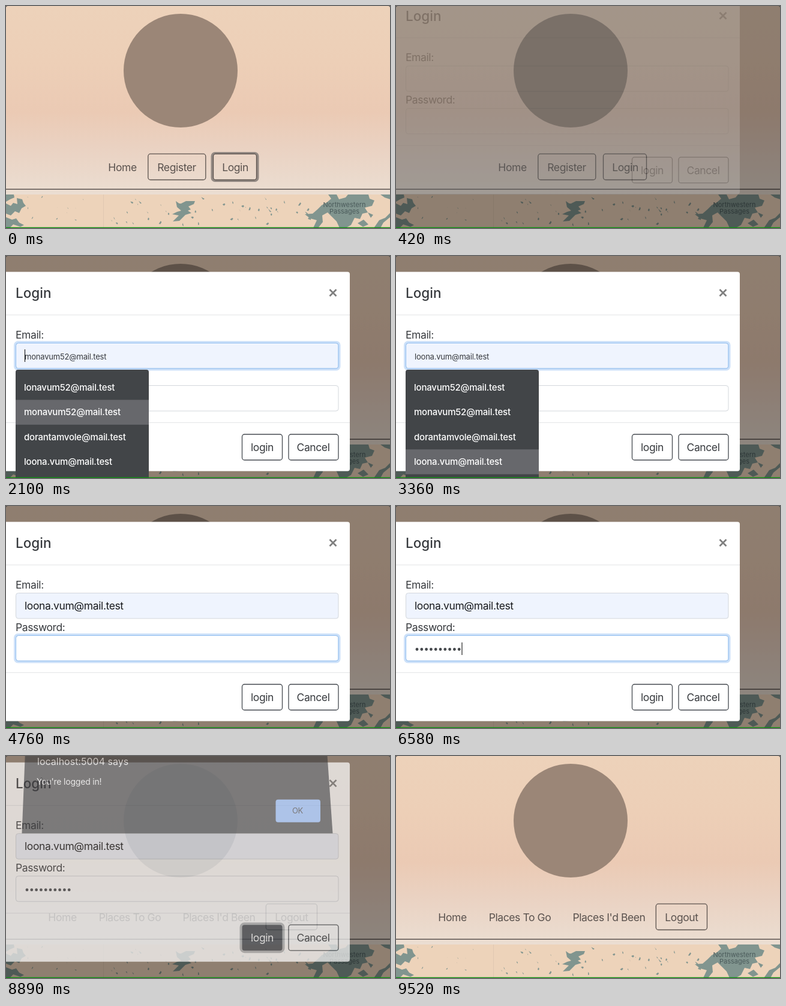
Animation of 640 by 371 pixels, one loop 9.59 s. Source, as an HTML page:

```html
<!DOCTYPE html>
<html lang="en">
<head>
<meta charset="utf-8">
<title>Login</title>
<style>
  html, body { margin: 0; width: 100%; height: 100%; overflow: hidden; }
  svg { display: block; width: 100vw; height: 100vh; }
  text { font: 17.5px Inter, "Liberation Sans", sans-serif; letter-spacing: -.4px; fill: #36393d; }
  .mid { text-anchor: middle; }
  .nav text { fill: #59514d; }
  .nav rect { fill: none; stroke: #5c534e; stroke-width: 1.3; }
  .map text { font-size: 11px; letter-spacing: 0; fill: #4b5b5b; }
  .land { fill: #81958f; }
  .rule { stroke: #e4e5e7; }
  .field { fill: #fff; stroke: #d3d7dc; }
  .ring { fill: none; stroke: #cde1f9; stroke-width: 4; }
  .edge { fill: none; stroke: #8fbdf0; }
  .button { fill: #fff; stroke: #454a50; stroke-width: 1.3; }
  .list text { font-size: 15px; font-weight: 500; letter-spacing: -.2px; fill: #fff; }
  .alert text { fill: #f1f2f4; }
</style>
</head>
<body>
<svg viewBox="0 0 640 371" preserveAspectRatio="none">
  <defs>
    <linearGradient id="sky" x1="0" y1="0" x2="0" y2="1">
      <stop offset="0" stop-color="#edd2ba"/>
      <stop offset=".3" stop-color="#edcfb7"/>
      <stop offset=".56" stop-color="#ebcab4"/>
      <stop offset=".75" stop-color="#ead2c2"/>
      <stop offset="1" stop-color="#ebded2"/>
    </linearGradient>
  </defs>

  <rect width="640" height="316" fill="url(#sky)"/>
  <circle cx="291" cy="108" r="95" fill="#9b8677"/>
  <g class="nav mid" id="guest">
    <text x="194" y="275.5">Home</text>
    <rect x="236.8" y="247.2" width="96" height="43.3" rx="4"/>
    <text x="284.5" y="275.5">Register</text>
    <rect id="loginRing" x="343.5" y="246" width="76" height="46" rx="5" style="stroke:#938983;stroke-width:4"/>
    <rect x="345.5" y="247.2" width="72" height="43.3" rx="4"/>
    <text x="382" y="275.5">Login</text>
  </g>
  <g class="nav mid" id="member">
    <text x="94" y="275.5">Home</text>
    <text x="206.5" y="275.5">Places To Go</text>
    <text x="355" y="275.5">Places I'd Been</text>
    <rect x="433.3" y="247.2" width="85.2" height="43.3" rx="4"/>
    <text x="476" y="275.5">Logout</text>
  </g>
  <path d="M0 306.3H640" stroke="#5b5350" stroke-width="1.5"/>

  <g class="map">
    <rect y="315" width="640" height="56" fill="#edd3ba"/>
    <path d="M162.5 315V371" stroke="#dfc8b1"/>
    <g class="land" id="land">
      <path d="M0 315H13L14 320 7 323 0 327ZM0 330 8 334 12 329 19 331 18 321 27 323 29 329 33 334 26 338 22 346 15 343 8 350 0 347ZM0 353 10 357 17 355 22 362 30 366 24 369 12 365 6 371H0Z"/>
      <path d="M283 326 290 331 300 326 315 326 313 331 304 335 308 340 303 342 309 346 299 349 289 359 278 360 288 350 277 348 285 344 292 342 285 336Z"/>
      <path d="M537 315H551L555 323 566 320 570 315H604L606 322 614 325 610 334 598 337 603 345 594 347 590 356 581 354 575 366 566 371H556L551 360 543 352 536 345 527 350 528 361 520 371H512L518 358 507 355 498 348 511 347 519 340 526 333 535 328 542 322ZM624 315H640V323L631 320ZM603 345 612 349 608 354ZM586 363 596 357 604 365 595 369ZM613 371 622 358 632 354 640 346V353L629 362 624 371Z"/>
    </g>
    <g class="mid">
      <text x="564" y="335.5">Northwestern</text>
      <text x="564" y="346.5">Passages</text>
    </g>
  </g>

  <rect id="shade" width="640" height="371"/>

  <g id="modal">
    <rect x="-10" y="26.5" width="583" height="333" rx="4" fill="#fff"/>
    <text x="16" y="70" style="font-size:22.5px;font-weight:500;letter-spacing:0">Login</text>
    <path d="M539.5 56 550.5 67M550.5 56 539.5 67" stroke="#808080" stroke-width="2.8"/>
    <path class="rule" d="M0 98.5H573M0 278.5H573"/>
    <text x="16" y="137.5">Email:</text>
    <text x="16" y="208.5">Password:</text>
    <rect id="emailBox" class="field" x="16.5" y="145.5" width="537.5" height="42.5" rx="4"/>
    <rect class="field" x="16.5" y="216.5" width="537.5" height="42.5" rx="4"/>
    <g id="emailFocus">
      <rect class="ring" x="15" y="144" width="540.5" height="45.5" rx="5"/>
      <rect class="edge" x="16.5" y="145.5" width="537.5" height="42.5" rx="4"/>
    </g>
    <g id="passFocus">
      <rect class="ring" x="15" y="215" width="540.5" height="45.5" rx="5"/>
      <rect class="edge" x="16.5" y="216.5" width="537.5" height="42.5" rx="4"/>
    </g>
    <text id="email" x="31" y="173"></text>
    <g id="dots" fill="#45484c"></g>
    <path id="caret" stroke="#222" stroke-width="1.2"/>
    <rect class="button" x="393.5" y="298" width="67" height="43" rx="4"/>
    <rect class="button" x="471" y="298" width="83" height="43" rx="4"/>
    <rect id="pressed" x="391.5" y="296" width="71" height="47" rx="6" fill="#4b5057" stroke="#b4b7ba" stroke-width="4"/>
    <g class="mid">
      <text id="submit" x="427" y="326">login</text>
      <text x="512" y="326">Cancel</text>
    </g>
    <g class="list" id="list">
      <path d="M16 371V194Q16 190 20 190H234Q238 190 238 194V371Z" fill="#424548"/>
      <rect id="hover" x="16" width="222" height="41.5" fill="#67686c"/>
    </g>
  </g>

  <g class="alert" id="alert">
    <path id="sheet" fill="#35363a"/>
    <g id="sheetBody">
      <text x="52" y="5" style="font-size:16px;letter-spacing:0">localhost:5004 says</text>
      <text x="51" y="38" style="font-size:14px;letter-spacing:-.2px">You're logged in!</text>
      <rect x="449.5" y="62.5" width="74.5" height="38" rx="4" fill="#8ab4f8"/>
      <text class="mid" x="486" y="86" style="font-size:13px;fill:#35363a">OK</text>
    </g>
  </g>

  <path d="M0 0H3Q0 0 0 3ZM640 0H637Q640 0 640 3Z" fill="#3c3a38"/>
  <rect y="369.7" width="640" height="1.3" fill="#0f8f12"/>
</svg>
<script>
const LOOP = 9590;
const emails = ['lonavum52@mail.test', 'monavum52@mail.test', 'dorantamvole@mail.test', 'loona.vum@mail.test'];
const hovers = [1820, 2100, 2590, 2800];
const keys = [4900, 5040, 5250, 5390, 5530, 5670, 5810, 6020, 6300, 6440];
const PICK = 3570;

const $ = id => document.getElementById(id);
const set = (id, attrs) => { for (const k in attrs) $(id).setAttribute(k, attrs[k]); };
const fade = (id, v) => set(id, { opacity: v, visibility: v > 0 ? 'visible' : 'hidden' });
const ramp = (t, from, to) => Math.min(1, Math.max(0, (t - from) / (to - from)));
const pulse = (t, a, b, c, d) => ramp(t, a, b) - ramp(t, c, d);
const easeOut = p => 1 - (1 - p) ** 1.7;
const count = (times, t) => times.filter(x => x <= t).length;

function add(parent, tag, attrs, text = '') {
  const el = document.createElementNS('http://www.w3.org/2000/svg', tag);
  for (const k in attrs) el.setAttribute(k, attrs[k]);
  el.textContent = text;
  $(parent).append(el);
}

emails.forEach((e, i) => add('list', 'text', { x: 30, y: 225 + i * 41.4 }, e));
keys.forEach((_, i) => add('dots', 'circle', { cx: 35 + i * 7.8, cy: 239.5, r: 2.4 }));

// Scattered islets: thin, slanted slivers
let seed = 11;
const rnd = () => (seed = seed * 16807 % 2147483647) / 2147483647;
for (let i = 0; i < 60; i++) {
  const x = 36 + rnd() * 470, y = 318 + rnd() * 48, size = x < 165 ? 4 : 6;
  const dx = (rnd() - .3) * size, dy = (rnd() - .6) * size * 1.5;
  const w = x < 165 ? .8 : 1.6;
  add('land', 'path', { d: `M${x} ${y}l${dx} ${dy} ${w} ${w} ${-dx * .6} ${w - dy * .4}z` });
}

function drawAlert(a) {
  fade('alert', a);
  const k = (1 - a) / .56, bottom = 119 + 18 * a;
  const top = [28 + 5 * k, 543 - 10 * k], low = [28 - 2 * k, 543 + 2 * k];
  set('sheet', { d: `M${top[0]} -2H${top[1]}L${low[1]} ${bottom}H${low[0]}Z` });
  set('sheetBody', { transform: `translate(0 ${18 * a})` });
}

function draw(t) {
  const member = t >= 8000;
  fade('guest', member ? 0 : 1);
  fade('member', member ? 1 : 0);
  fade('loginRing', t < 350 ? 1 : 0);
  fade('shade', .4 * pulse(t, 35, 385, 9050, 9310));

  const drop = easeOut(ramp(t, 370, 1270)) - easeOut(ramp(t, 8710, 9610));
  fade('modal', pulse(t, 350, 750, 8770, 9180));
  set('modal', { transform: `translate(0 ${50 * (drop - 1)})` });

  const row = count(hovers, t) - 1, picked = t >= PICK;
  fade('list', t >= 1540 && !picked ? 1 : 0);
  fade('hover', row >= 0 && !picked ? 1 : 0);
  set('hover', { y: 199 + 41.4 * row });
  $('email').textContent = emails[row] || '';
  $('email').style.cssText = picked ? 'fill:#17191c' : 'font-size:13px;letter-spacing:-.2px';
  $('emailBox').style.fill = row >= 0 ? '#eff4fe' : '#fff';
  fade('emailFocus', pulse(t, 1330, 1600, 4130, 4410));
  fade('passFocus', pulse(t, 4130, 4410, 7100, 7350));

  const typed = count(keys, t);
  [...$('dots').children].forEach((d, i) => d.setAttribute('visibility', i < typed ? 'inherit' : 'hidden'));
  const inEmail = t >= 1400 && t < 2240, inPass = t >= 4900 && t < 7100;
  fade('caret', inEmail || inPass ? 1 : 0);
  set('caret', { d: inEmail ? 'M31.5 156V177' : `M${32 + typed * 7.8} 228V249` });

  const press = ramp(t, 7100, 7350);
  fade('pressed', press);
  $('submit').style.fill = press > .5 ? '#fff' : '';

  drawAlert(pulse(t, 7540, 8060, 8700, 9150));
}

function frame(now) {
  draw(now % LOOP);
  requestAnimationFrame(frame);
}
draw(0);
requestAnimationFrame(frame);
</script>
</body>
</html>
```
